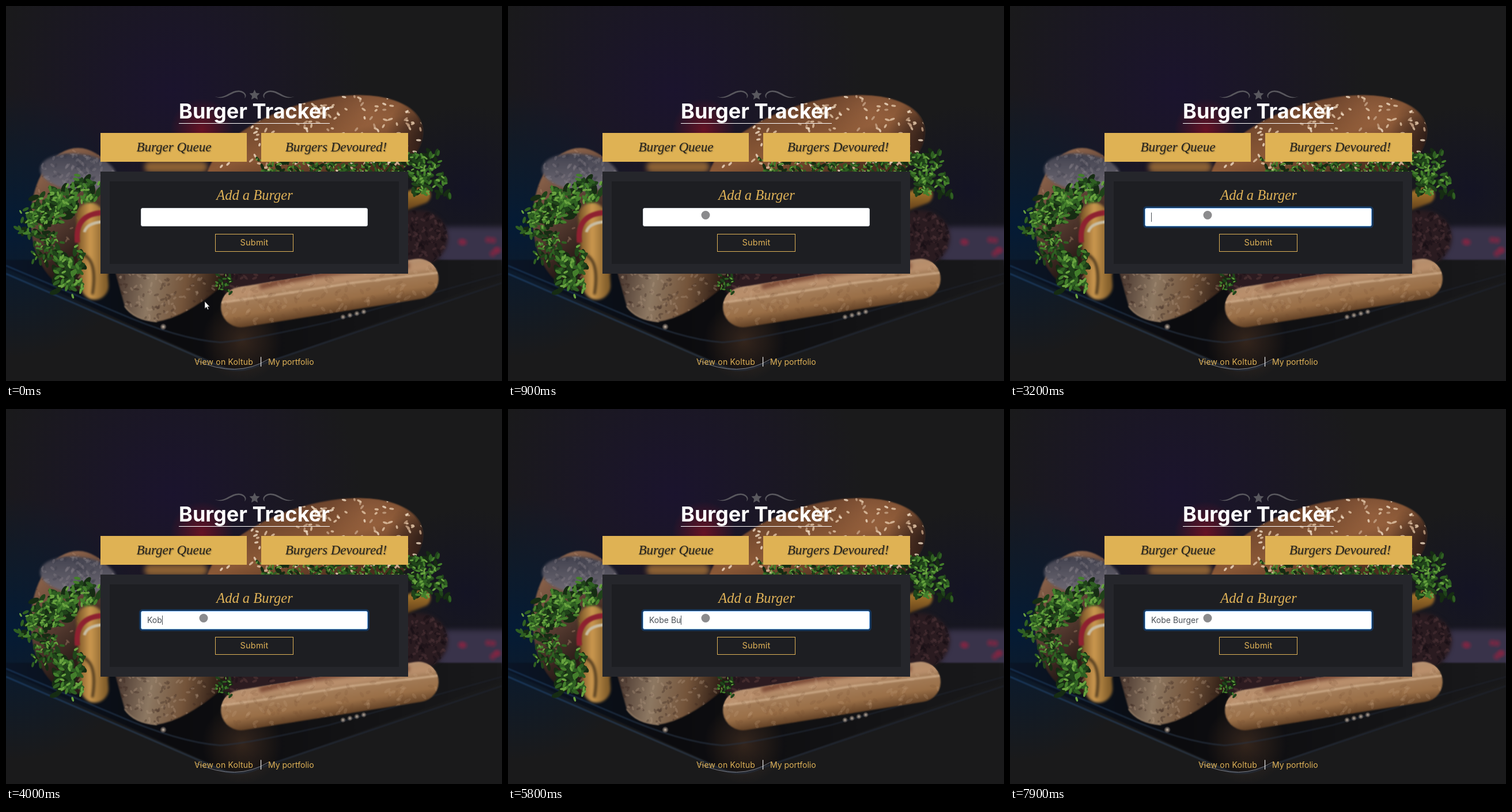
An HTML page with a canvas for the animation above (8 s loop, 861 px wide and 650 px high).

```html
<!DOCTYPE html>
<html lang="en">
<head>
<meta charset="utf-8">
<title>Burger Tracker</title>
<style>
  html, body { margin: 0; width: 100%; height: 100%; overflow: hidden; background: #1a1a1b; }
  #stage { position: relative; width: 861px; height: 650px; overflow: hidden; }
  #stage > * { position: absolute; left: 0; top: 0; }
  text, #field { font-family: Inter, "Open Sans", sans-serif; }
  .script { font-family: "Liberation Serif", "Noto Serif", serif; font-style: italic; text-anchor: middle; }
  .tab { font-size: 23px; fill: #25231f; text-shadow: 1px 1px 2px rgba(0,0,0,.4); }
  .gold { fill: #dfb257; }
  .small { font-size: 14px; }
  #stage #field {
    left: 234px; top: 350px; width: 394px; height: 32px; box-sizing: border-box;
    padding-left: 10px; border: 1px solid #ced4da; border-radius: 3px; background: #fff;
    font-size: 14px; line-height: 30px; color: #495057; white-space: pre;
  }
  #stage #field.focus { border-color: #80bdff; box-shadow: 0 0 0 3px rgba(0,123,255,.25); }
  #caret { display: inline-block; width: 1px; height: 16px; margin-right: -1px; background: #495057; vertical-align: -3px; }
</style>
</head>
<body>
<div id="stage">
  <canvas id="photo" width="861" height="650"></canvas>

  <svg width="861" height="650" viewBox="0 0 861 650">
    <g fill="#59585e">
      <path id="swirl" d="M361 156C378 164 388 146 404 146.500C415 147 420 156 414 160C417 154 411 149 404 149C390 149 380 166 361 156Z"/>
      <use href="#swirl" transform="matrix(-1 0 0 1 863 0)"/>
      <path id="star"/>
    </g>
    <text x="431" y="195" font-size="36" font-weight="700" fill="#fff" text-anchor="middle">Burger Tracker</text>
    <path d="M300 203.500H562" stroke="#fff"/>

    <path d="M164 220H418V270H164ZM443 220H698V270H443Z" fill="#dfb254"/>
    <text class="script tab" x="291.500" y="252">Burger Queue</text>
    <text class="script tab" x="573" y="252">Burgers Devoured!</text>

    <path d="M164 287H698V464H164Z" fill="#25262b"/>
    <path d="M180 304H682V447H180Z" fill="#1d1e22"/>
    <text class="script gold" x="431.500" y="336" font-size="24.500">Add a Burger</text>
    <rect x="363.500" y="395.500" width="135" height="30" fill="none" stroke="#dfb257"/>
    <text class="gold" x="431" y="415" font-size="14.500" letter-spacing=".2" text-anchor="middle">Submit</text>

    <text class="gold small" x="327" y="622" letter-spacing=".2">View on Koltub</text>
    <text class="small" x="442.500" y="622" fill="#fff" text-anchor="middle">|</text>
    <text class="gold small" x="455" y="622">My portfolio</text>
  </svg>

  <div id="field"><span id="typed"></span><span id="caret"></span></div>

  <svg width="861" height="650" viewBox="0 0 861 650">
    <path id="arrow" d="M0 0V12.500L3 9.800L5 14.300L6.800 13.500L4.900 9.200H8.600Z" fill="#fff" stroke="#222" stroke-width=".6"/>
    <circle id="dot" r="7.500" fill="#8b8b8d"/>
  </svg>
</div>

<script>
const $ = id => document.getElementById(id);
const ctx = $('photo').getContext('2d');

let seed = 41;
const rnd = () => (seed = (seed * 16807) % 2147483647) / 2147483647;
const spread = a => (rnd() - .5) * 2 * a;
const pick = list => list[Math.floor(rnd() * list.length)];

// Each shape is a path with its bounding box.
function oval(cx, cy, rx, ry, turn = 0) {
  const path = new Path2D(), c = Math.cos(turn), s = Math.sin(turn);
  path.ellipse(cx, cy, rx, ry, turn, 0, 7);
  const w = Math.hypot(rx * c, ry * s), h = Math.hypot(rx * s, ry * c);
  return { path, box: [cx - w, cy - h, 2 * w, 2 * h] };
}

function capsule(x0, y0, x1, y1, r) {
  const path = new Path2D(), a = Math.atan2(y1 - y0, x1 - x0), q = Math.PI / 2;
  path.arc(x0, y0, r, a + q, a + 3 * q);
  path.arc(x1, y1, r, a - q, a + q);
  path.closePath();
  const x = Math.min(x0, x1) - r, y = Math.min(y0, y1) - r;
  return { path, box: [x, y, Math.abs(x1 - x0) + 2 * r, Math.abs(y1 - y0) + 2 * r] };
}

function paint({ path }, fill, blur = 1) {
  ctx.filter = `blur(${blur}px)`;
  ctx.fillStyle = fill;
  ctx.fill(path);
  ctx.filter = 'none';
}

function inside({ path }, draw) {
  ctx.save();
  ctx.clip(path);
  draw();
  ctx.restore();
}

function line(d, color, width, blur = 1) {
  ctx.filter = `blur(${blur}px)`;
  ctx.strokeStyle = color;
  ctx.lineWidth = width;
  ctx.stroke(new Path2D(d));
  ctx.filter = 'none';
}

function ramp(x0, y0, x1, y1, ...colors) {
  const g = ctx.createLinearGradient(x0, y0, x1, y1);
  colors.forEach((c, i) => g.addColorStop(i / (colors.length - 1), c));
  return g;
}

function glow(x, y, r, rgb, a) {
  const g = ctx.createRadialGradient(x, y, 0, x, y, r);
  g.addColorStop(0, `rgba(${rgb},${a})`);
  g.addColorStop(1, `rgba(${rgb},0)`);
  ctx.fillStyle = g;
  ctx.fillRect(x - r, y - r, 2 * r, 2 * r);
}

// Scatters small grains inside a shape.
function grains(shape, count, colors, size, alpha) {
  const [x, y, w, h] = shape.box;
  inside(shape, () => {
    ctx.globalAlpha = alpha;
    for (let i = 0; i < count; i++) {
      paint(oval(x + rnd() * w, y + rnd() * h, size * (.8 + rnd() * .6), size * .55, spread(1.5)), pick(colors), .3);
    }
  });
}

// Ragged leaves along a line, dark ones first and bright ribs last.
function lettuce(x0, y0, x1, y1, r) {
  const greens = ['#162c13', '#20431a', '#2f5f22', '#447f2c', '#69a340'];
  const count = Math.hypot(x1 - x0, y1 - y0) * r / 16 + r;
  for (let i = 0; i < count; i++) {
    const k = rnd(), shade = Math.floor(i / count * greens.length);
    const size = r * (.42 - shade * .06);
    paint(oval(x0 + (x1 - x0) * k + spread(r), y0 + (y1 - y0) * k + spread(r),
      size, size * .45, spread(1.5)), greens[shade], .6);
  }
}

function paintTable() {
  ctx.fillStyle = '#1a1a1b';
  ctx.fillRect(0, 0, 861, 650);
  glow(290, 150, 330, '27,18,50', .8);
  glow(10, 380, 230, '2,27,56', .9);
  glow(800, 320, 150, '18,18,38', .8);
  glow(340, 215, 55, '110,18,36', .9);
  paint(capsule(770, 415, 900, 415, 32), '#39334a', 5);
  for (let i = 0; i < 7; i++) glow(790 + rnd() * 65, 395 + rnd() * 35, 9, '140,35,65', .7);

  paint({ path: new Path2D('M0 455L370 622Q400 636 440 622L861 472V440H0Z') },
    ramp(0, 0, 861, 0, '#0a1526', '#0b0b0e', '#121214', '#19191b'));
  glow(410, 580, 70, '90,60,40', .5);
  const rim = ramp(0, 0, 861, 0, '#1b3f68', '#2c3a4c', '#222a38', '#1e222c');
  line('M0 450L190 530Q300 578 372 583Q420 580 560 548L861 464', rim, 1.5);
  line('M0 464L365 622Q400 640 440 622L861 480', rim, 2);
  line('M330 614Q400 646 456 612', '#7c7f88', 1, .4);
}

function paintLeftBurger() {
  const crust = oval(125, 370, 82, 124);
  paint(crust, ramp(43, 300, 140, 420, '#8d644b', '#5d4034', '#2a1c18'));
  grains(crust, 140, ['#b18c72', '#4a3028'], 3, .35);
  const crumb = oval(125, 288, 66, 32, .1);
  paint(crumb, ramp(60, 256, 60, 320, '#42424f', '#716c76'), 2);
  grains(crumb, 110, ['#8f8890', '#3c3c4a'], 4, .3);
  paint(capsule(250, 279, 340, 279, 10), '#8a6034', 4);

  lettuce(155, 312, 70, 355, 24);
  lettuce(75, 350, 35, 385, 20);
  lettuce(85, 400, 55, 432, 16);
  paint(capsule(146, 365, 154, 485, 24), ramp(120, 0, 172, 0, '#6d4a20', '#cb984f', '#85602c'), 2);
  line('M124 410Q118 360 170 358', '#8e2130', 9);
  line('M136 392Q140 376 168 374', '#c8bda4', 5);
  line('M132 430Q160 440 150 500', '#3a2a16', 4, 2);
  lettuce(110, 435, 108, 485, 24);

  const bun = { path: new Path2D('M188 455H384L372 488Q310 540 262 547Q222 544 206 520Z'), box: [185, 460, 190, 90] };
  paint(bun, ramp(190, 490, 365, 520, '#4a3830', '#8d7862', '#74543a', '#2c1c14'));
  grains(bun, 150, ['#b59c84', '#37261e'], 3.5, .3);
  line('M206 520Q222 544 262 547', '#a88d72', 2);
}

function paintRightBurger() {
  const dome = oval(535, 262, 195, 95, -.3);
  paint(dome, ramp(560, 150, 600, 290, '#6b432c', '#8a5836', '#4c2d1e'));
  inside(dome, () => {
    glow(630, 185, 70, '170,112,74', .4);
    glow(735, 225, 75, '24,16,18', .8);
  });
  grains(dome, 330, ['#e2c6a8', '#c4a184', '#f0dcc4'], 3.4, .8);

  const meat = oval(715, 402, 52, 48);
  paint(meat, '#2a1b20', 3);
  grains(meat, 150, ['#4c3236', '#150e13'], 4, .5);
  paint(capsule(690, 340, 722, 328, 15), ramp(0, 312, 0, 358, '#b5822f', '#5b3a18'), 2);
  lettuce(440, 275, 690, 278, 14);
  lettuce(700, 272, 742, 268, 18);
  lettuce(705, 298, 752, 315, 20);

  const patty = capsule(400, 482, 560, 462, 25);
  paint(patty, '#2c1b20', 2);
  grains(patty, 120, ['#5a3c39', '#1a1016'], 4, .5);
  const bun = capsule(408, 522, 716, 473, 35);
  paint(bun, ramp(555, 465, 566, 535, '#b89272', '#a37c58', '#9a6f47', '#5c3c22'));
  inside(bun, () => {
    line('M375 508Q480 478 540 478L760 446', '#b98f6c', 14, 3);
    line('M440 487Q560 456 700 450', '#7c4a36', 10, 3);
    line('M372 514Q480 500 600 480L752 462', '#d0ae8c', 3, 1.5);
  });
  grains(bun, 260, ['#d8b896', '#74492c'], 5, .15);
  lettuce(376, 468, 378, 486, 13);
  for (let i = 0; i < 4; i++) glow(585 + i * 12, 539 - i * 3, 5, '225,205,185', .8);
  glow(273, 556, 6, '225,205,185', .9);
}

function starPath(cx, cy, r) {
  return 'M' + Array.from({ length: 10 }, (_, i) => {
    const a = i * Math.PI / 5, q = i % 2 ? r * .48 : r;
    return `${cx + q * Math.sin(a)} ${cy - q * Math.cos(a)}`;
  }).join('L') + 'Z';
}

// Bursts of typing: start, pause between keys, text before, keys.
const bursts = [
  [3600, 200, '', 'Kobe'], [4300, 100, 'Kobe', 'r'],
  [5700, 100, 'Kobe ', 'Bu'], [6100, 100, 'Kobe Bu', 'rger']
];
const focusTime = 1300, fixTime = 5000, blink = 500;

function typedAt(t) {
  const burst = bursts.filter(b => b[0] <= t).pop();
  if (!burst) return { text: '', since: focusTime - 100 };
  const [begin, pause, before, keys] = burst;
  const n = Math.min(keys.length - 1, Math.floor((t - begin) / pause));
  const text = before + keys.slice(0, n + 1);
  return { text: t >= fixTime ? text.replace(/^Kober/, 'Kobe ') : text, since: begin + n * pause };
}

function render(now) {
  const t = Math.floor(now / 100) * 100;
  const { text, since } = typedAt(t);
  const focused = t >= focusTime;
  const caretOn = focused && Math.floor((t - since) / blink) % 2 === 0;

  const k = Math.min(1, Math.max(0, (t - 400) / 500));
  const x = 345 - 2 * k, y = 512 - 149.5 * k * k * (3 - 2 * k);
  const inField = y < 384;
  const justCapital = /[A-Z]$/.test(text);   // the pointer hides while a word begins

  $('typed').textContent = text;
  $('caret').style.visibility = caretOn ? 'visible' : 'hidden';
  $('field').className = focused ? 'focus' : '';
  for (const [id, shown] of [['arrow', !inField], ['dot', inField && !justCapital]]) {
    $(id).setAttribute('transform', `translate(${x} ${y})`);
    $(id).style.visibility = shown ? 'visible' : 'hidden';
  }
}

paintTable();
paintLeftBurger();
paintRightBurger();
$('star').setAttribute('d', starPath(431.5, 154.5, 9.5));

const start = performance.now();
function tick() {
  render((performance.now() - start) % 8000);
  requestAnimationFrame(tick);
}
render(0);
requestAnimationFrame(tick);
</script>
</body>
</html>
```
